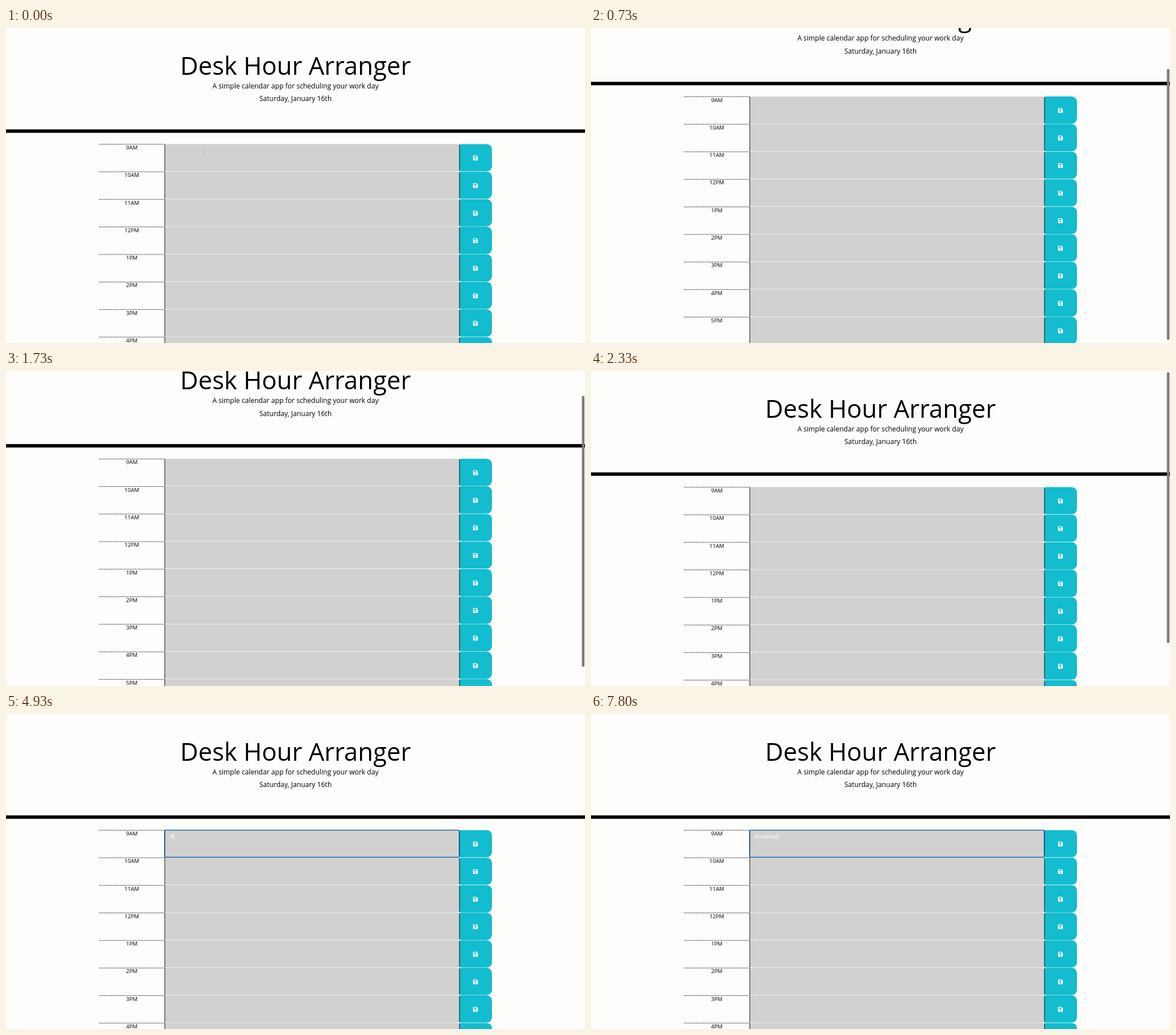
Recreate the animation shown at these times as an HTML page with a canvas. Size 1014 by 552 pixels, loop 8000 ms.

```html
<!DOCTYPE html>
<html lang="en">
<head>
<meta charset="utf-8">
<title>Day planner</title>
<style>
  html, body { margin: 0; width: 100%; height: 100%; overflow: hidden; background: #fdfefc; }
  canvas { display: block; }
</style>
</head>
<body>
<canvas id="stage" width="1014" height="552"></canvas>
<script>
const ctx = document.getElementById('stage').getContext('2d');
const LOOP = 8000, TICK = 1000 / 15;
const SCALE = 1014 / 1680;            // page is laid out 1680 units wide
const LEFT = 270, FIELD = 460, BUTTON = 1315, RIGHT = 1410;
const TOP = 337, ROW = 80, BOX = 79, MAX_SCROLL = 90;
const PAPER = '#fdfefc', GREY = '#d1d1cf', TEAL = '#14bccf';
const HOURS = ['9AM', '10AM', '11AM', '12PM', '1PM', '2PM', '3PM', '4PM', '5PM'];

const WORD = 'Breakfas';
const KEYS = [4930, 5660, 5730, 6330, 7130, 7460, 7600, 7800];
const FOCUS = 3060, BLINK = 530;

const clamp = u => Math.min(1, Math.max(0, u));

function text(str, x, y, size, align = 'center', color = '#000') {
  ctx.font = `${size}px "Open Sans", sans-serif`;
  ctx.textAlign = align;
  ctx.fillStyle = color;
  ctx.fillText(str, x, y);
}

function rect(x, y, w, h, color) {
  ctx.fillStyle = color;
  ctx.fillRect(x, y, w, h);
}

function round(x, y, w, h, r, color) {
  ctx.fillStyle = color;
  ctx.beginPath();
  ctx.roundRect(x, y, w, h, r);
  ctx.fill();
}

// Screen pixels scrolled, sampled 15 times a second
function scrollAt(time) {
  const t = Math.floor((time + 7) / TICK) * TICK;
  const down = clamp(t / 880);
  const up = clamp((t - 1267) / 733);
  return MAX_SCROLL * (down * down * (3 - 2 * down) - up ** 1.77);
}

function saveIcon(x, y) {
  ctx.fillStyle = '#fff';
  ctx.beginPath();
  ctx.moveTo(x + 1.5, y);
  ctx.lineTo(x + 10.5, y);
  ctx.lineTo(x + 14, y + 3.5);
  ctx.lineTo(x + 14, y + 12.5);
  ctx.arcTo(x + 14, y + 14, x + 12.5, y + 14, 1.5);
  ctx.lineTo(x + 1.5, y + 14);
  ctx.arcTo(x, y + 14, x, y + 12.5, 1.5);
  ctx.lineTo(x, y + 1.5);
  ctx.arcTo(x, y, x + 1.5, y, 1.5);
  ctx.fill();
  rect(x + 2, y + 2, 8, 3.5, TEAL);
  ctx.beginPath();
  ctx.arc(x + 7, y + 9.5, 2, 0, 7);
  ctx.fill();
}

function row(label, i) {
  const y = TOP + i * ROW;
  ctx.strokeStyle = '#000';
  ctx.lineWidth = 1.5;
  ctx.setLineDash([3, 2]);
  ctx.beginPath();
  ctx.moveTo(LEFT, y + 0.5);
  ctx.lineTo(FIELD, y + 0.5);
  ctx.stroke();
  ctx.setLineDash([]);
  text(label, (LEFT + FIELD) / 2, y + 15.8, 16);

  rect(FIELD, y, BUTTON - FIELD, BOX, GREY);
  rect(FIELD, y, 1.6, BOX, '#111');
  round(BUTTON, y, RIGHT - BUTTON, BOX, [4, 15, 15, 4], TEAL);
  rect(BUTTON, y + 2, 1.6, BOX - 4, '#111');
  saveIcon(1355, y + 33.5);
}

function entry(t) {
  if (t < FOCUS) return;
  ctx.strokeStyle = '#1a63ae';
  ctx.lineWidth = 2.4;
  ctx.beginPath();
  ctx.roundRect(FIELD, TOP, BUTTON - FIELD, BOX, 3);
  ctx.stroke();

  const pressed = KEYS.filter(k => k <= t);
  const typed = WORD.slice(0, pressed.length);
  text(typed, 476, 361, 16, 'left', '#fff');

  const idle = t - (pressed.at(-1) ?? FOCUS);
  const fading = !typed && t < 3800;
  if (idle < BLINK || fading) {
    const x = 476 + ctx.measureText(typed).width;
    rect(x, 345, 1.5, 21, idle < BLINK ? '#f6f6f4' : '#e9e9e6');
  }
}

function pointer(x, y) {
  for (let i = 0; i < 3; i++) rect(x, y + i * 6, 1.4, 1.8, '#777');
}

function scrollbar(t, scroll) {
  if (t < 60) return;
  ctx.globalAlpha = 1 - clamp((t - 2450) / 300);
  round(1008.5, 2 + scroll * 0.835, 4.5, 475, 2.2, '#7b7b7b');
  ctx.globalAlpha = 1;
}

function draw(t) {
  const scroll = scrollAt(t);
  ctx.setTransform(1, 0, 0, 1, 0, 0);
  rect(0, 0, 1014, 552, PAPER);

  ctx.setTransform(SCALE, 0, 0, SCALE, 0, -scroll);
  text('Desk Hour Arranger', 840, 135.5, 72);
  text('A simple calendar app for scheduling your work day', 840, 175.3, 20);
  text('Saturday, January 16th', 840, 212.3, 20);
  rect(0, 294.3, 1680, 10, '#000');
  HOURS.forEach(row);
  entry(t);
  if (t < 60) pointer(574.5, 355);
  if (t >= 3600 && t < 3800) pointer(828, 420);

  ctx.setTransform(1, 0, 0, 1, 0, 0);
  scrollbar(t, scroll);
}

const start = performance.now();
function frame() {
  draw((performance.now() - start) % LOOP);
  requestAnimationFrame(frame);
}
frame();
</script>
</body>
</html>
```
